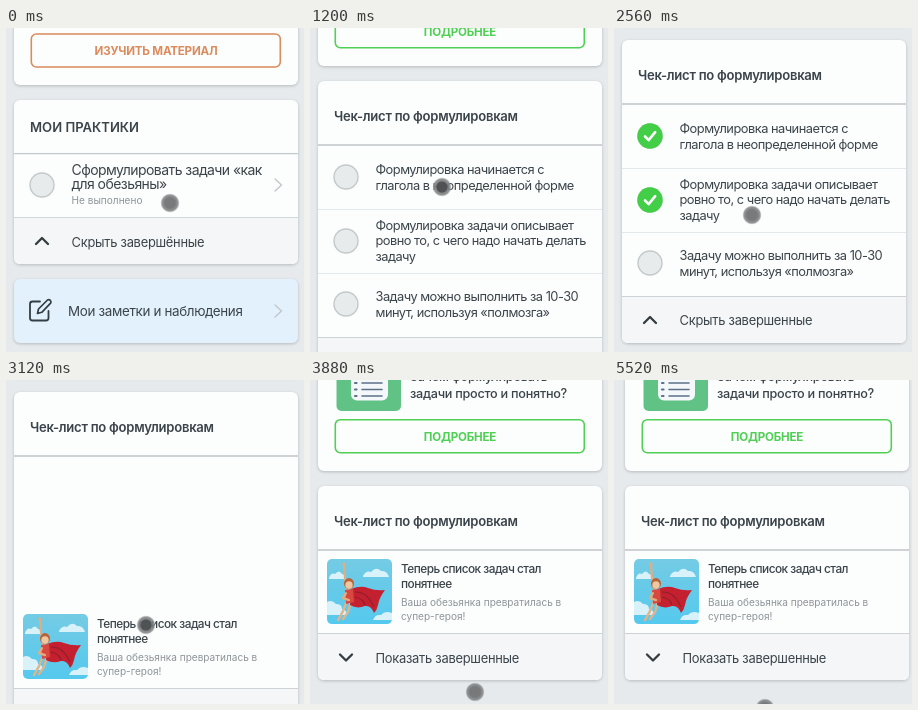
Recreate the animation shown at these times as an HTML page. Size 298x324 px, loop 5.6 s.

```html
<!DOCTYPE html>
<html lang="ru">
<head>
<meta charset="utf-8">
<style>
  html, body { margin: 0; width: 100%; height: 100%; overflow: hidden; background: #e6eaec; }
  svg { display: block; width: 100vw; height: 100vh; }
  text { font-family: Inter, Roboto, sans-serif; fill: #3b444a; white-space: pre; }
  .card { fill: #fcfdfd; filter: drop-shadow(0 1px 1.5px #0003); }
  .line { fill: none; stroke-linecap: round; stroke-linejoin: round; }
</style>
</head>
<body>
<svg id="stage" viewBox="0 0 298 324"></svg>
<script>
const LOOP = 5600, OPEN = 660, COLLAPSE = 3000;
const CHECKS = [1920, 2280, 2760];
const ROW_Y = [61, 125, 188];
const ROWS_H = 192, HERO_H = 83;

const text = (x, y, s, size, { w = 400, ls = 0, fill = '#3b444a', mid } = {}) =>
  `<text x="${x}" y="${y + size * .35}" font-size="${size}" font-weight="${w}"
    letter-spacing="${ls}em" style="fill:${fill}" ${mid ? 'text-anchor="middle"' : ''}>${s}</text>`;
const card = (y, h, extra = '') =>
  `<rect class="card" x="8" y="${y}" width="284" height="${h}" rx="6" ${extra}/>`;
const rule = (y, color, width = 1) => `<path d="M8 ${y}H292" stroke="${color}" stroke-width="${width}"/>`;
const line = (d, color, width) =>
  `<path class="line" d="${d}" stroke="${color}" stroke-width="${width}"/>`;
const button = (y, label, color, size) =>
  `<rect x="25.3" y="${y}" width="249" height="33" rx="5" fill="none" stroke="${color}" stroke-width="1.6"/>` +
  text(150, y + 17, label, size, { w: 700, ls: -.02, fill: color, mid: true });
const circle = y => `<circle cx="36" cy="${y}" r="12" fill="#e7ebeb" stroke="#c3c9ca" stroke-width="1.4"/>`;
const arrow = y => line(`M269 ${y - 6}l6.5 6-6.5 6`, '#c0c7cb', 1.4);
const footerShape = '<path d="M8 0H292V41q0 6-6 6H14q-6 0-6-6Z" fill="#f4f6f7"/>';
const item = (y, ...lines) =>
  lines.map((s, i) => text(65.5, y + i * 15.5, s, 12.85, { ls: -.04 })).join('');
const tick = (y, i) =>
  `<g id="tick${i}"><circle r="12.7" fill="#42cf47"/>${line('M-5 .5l3.6 3.7L5.2-3.8', '#fff', 2.6)}</g>`;

const practices = `
  ${card(-20, 77)}${button(6, 'ИЗУЧИТЬ МАТЕРИАЛ', '#dc8b5c', 11.6)}
  ${card(72, 164)}
  <g transform="translate(0 189)">${footerShape}</g>
  ${rule(125.7, '#c3c9cc', 1.3)}${rule(189.5, '#d3d8da')}
  ${text(24, 99, 'МОИ ПРАКТИКИ', 13.1, { w: 600 })}
  ${circle(157)}${arrow(157)}
  ${text(65.5, 142.5, 'Сформулировать задачи «как', 14, { ls: -.04 })}
  ${text(65.5, 156.5, 'для обезьяны»', 14, { ls: -.04 })}
  ${text(65.5, 172.7, 'Не выполнено', 10.1, { fill: '#8d9498' })}
  ${line('M30 216l6-6 6 6', '#343c41', 2.3)}
  ${text(65.5, 214, 'Скрыть завершённые', 12.9, { ls: -.02 })}
  ${card(251, 64, 'style="fill:#e3f1fc"')}
  ${line('M34 273.5H26.5q-2.5 0-2.5 2.5V290q0 2.5 2.5 2.5H40q2.5 0 2.5-2.5V283', '#343d43', 1.8)}
  ${line('M31.5 285.5l1-4.5L41.5 272q1.5-1 2.8.3t.3 2.9L35.8 284.3Z', '#343d43', 1.7)}
  ${text(62, 283, 'Мои заметки и наблюдения', 13.4, { ls: -.025 })}
  ${arrow(283)}`;

// Local 65 x 65 picture of the flying hero
const heroPicture = `
  <rect width="65" height="65" rx="5" fill="url(#sky)"/>
  <g fill="#d9f2fa">
    <path d="M2 19q2-6 6-4 4-5 7 0 3 0 3 5H2Z"/>
    <path d="M36 17q3-6 8-4 5-6 10-1 6-1 8 6H36Z"/>
    <path d="M0 56V43q5-3 9 2 6 0 6 5 5 1 5 6Z"/>
    <path d="M46 61q2-6 8-5 4-5 11-2v7Z"/>
  </g>
  ${line('M20 42L16 52 11 61M24 43L21 53 16 60', '#e0b48c', 2.4)}
  <path d="M24 30Q34 26 41 29 49 32 58 31 52 39 51 46 50 51 47 54 44 46 38 47 30 50 23 46Z" fill="#c4202f"/>
  <path d="M28 33Q40 32 47 48M28 38Q36 39 38 46" fill="none" stroke="#94202c" stroke-width="1.3"/>
  ${line('M20 30L18 19 17 6', '#e3ad80', 2.2)}
  <path d="M18 31l8-1 1 13-8 2Z" fill="#d8483f"/>
  ${line('M19 34L16 39 22 41', '#e3ad80', 2.2)}
  <ellipse cx="22" cy="24.5" rx="5" ry="5.5" fill="#b8623a"/>
  <ellipse cx="22" cy="26" rx="3.7" ry="3.8" fill="#f0c8a0"/>
  <circle cx="17" cy="5" r="1.6" fill="#e3ad80"/>`;

// Checklist page, measured from the middle of its heading
const checklist = `
  ${card(-400, 350)}
  <rect x="26.5" y="-174" width="64.5" height="64" rx="5" fill="#60c385"/>
  <rect x="41" y="-162" width="37" height="41.5" rx="6" fill="#f4f8fa"/>
  ${[-151, -144.5, -138, -131.5, -125].map(y =>
    line(`M45 ${y}h1.5`, '#5d6f89', 2.2) + line(`M52 ${y}h20`, '#5d6f89', 1.6)).join('')}
  ${text(100, -144, 'Зачем формулировать', 12.65, { w: 500, ls: -.02 })}
  ${text(100, -127.7, 'задачи просто и понятно?', 12.65, { w: 500, ls: -.02 })}
  ${button(-101.3, 'ПОДРОБНЕЕ', '#4fd054', 11.6)}
  ${card(-35, 303, 'id="list"')}
  ${text(24, .6, 'Чек-лист по формулировкам', 13.1, { w: 600, ls: -.02 })}
  <g id="rows">
    ${rule(93.5, '#e5e8ea')}${rule(157.5, '#e5e8ea')}
    ${ROW_Y.map(circle).join('')}${ROW_Y.map(tick).join('')}
    ${item(54, 'Формулировка начинается с', 'глагола в неопределенной форме')}
    ${item(109.5, 'Формулировка задачи описывает', 'ровно то, с чего надо начать делать', 'задачу')}
    ${item(181, 'Задачу можно выполнить за 10-30', 'минут, используя «полмозга»')}
  </g>
  ${rule(29, '#c0c6ca', 1.4)}
  <g id="hero">
    <g transform="translate(17 8.4)">${heroPicture}</g>
    ${text(91, 18, 'Теперь список задач стал', 11.85, { w: 500, ls: -.045 })}
    ${text(91, 33.2, 'понятнее', 11.85, { w: 500, ls: -.045 })}
    ${text(91, 52, 'Ваша обезьянка превратилась в', 10.05, { fill: '#8d9498' })}
    ${text(91, 65.7, 'супер-героя!', 10.05, { fill: '#8d9498' })}
  </g>
  <g id="footer">
    ${footerShape}${rule(.5, '#cdd2d5')}
    <g id="hide">${line('M30 27l6-6 6 6', '#343c41', 2.3)}
      ${text(65.5, 24.8, 'Скрыть завершенные', 12.9, { ls: -.02 })}</g>
    <g id="show">${line('M30 21.5l6 6 6-6', '#343c41', 2.3)}
      ${text(65.5, 25.7, 'Показать завершенные', 12.9, { ls: -.02 })}</g>
  </g>`;

document.getElementById('stage').innerHTML = `
  <defs>
    <linearGradient id="sky" x2="0" y2="1">
      <stop stop-color="#74cbe4"/><stop offset="1" stop-color="#55c9ee"/>
    </linearGradient>
    <radialGradient id="soft">
      <stop offset=".55" stop-color="#717375"/>
      <stop offset=".85" stop-color="#858789" stop-opacity=".9"/>
      <stop offset="1" stop-color="#a5a8a9" stop-opacity=".2"/>
    </radialGradient>
  </defs>
  <rect width="298" height="324" fill="#e6eaec"/>
  <g id="practices">${practices}</g>
  <g id="checklist">${checklist}</g>
  <g id="pointer">
    <circle r="9.5" fill="url(#soft)" opacity=".95"/>
    <circle id="press" r="5.5" fill="#404346"/>
  </g>`;

const el = id => document.getElementById(id);
const set = (id, attrs) => { for (const k in attrs) el(id).setAttribute(k, attrs[k]); };
const move = (id, x, y, s = 1) => set(id, { transform: `translate(${x} ${y}) scale(${s})` });
const show = (id, on) => set(id, { opacity: +on });
const ramp = (t, a, b) => Math.min(1, Math.max(0, (t - a) / (b - a)));
const smooth = u => u * u * (3 - 2 * u);

// Pointer keys: time, x, y, pressure
const PATH = [
  [0, 164, 175, 0], [300, 150, 171, 0], [520, 141, 164, 1], [640, 141, 164, 0],
  [800, 134, 230, 1], [1200, 132, 159, 1], [1400, 133, 118, 1], [1560, 135, 114, 0],
  [1800, 138, 112, 0], [1900, 138, 112, 1], [2020, 138, 114, 0], [2180, 138, 178, 0],
  [2260, 138, 178, 1], [2380, 138, 180, 0], [2560, 138, 187, 0], [2720, 140, 243, 1],
  [3120, 140, 245, 1], [3280, 141, 247, 0], [3880, 165, 312, 0], [4160, 162, 274, 0],
  [4360, 162, 274, .5], [4560, 162, 274, 0], [4780, 162, 274, 0], [5380, 151, 320, 0],
  [5520, 151, 328, 0], [LOOP, 151, 328, 0]
];
function pointerAt(t) {
  const i = PATH.findIndex(k => k[0] > t), a = PATH[i - 1], b = PATH[i];
  const u = smooth(ramp(t, a[0], b[0]));
  return a.map((v, k) => v + (b[k] - v) * u);
}

function headingY(t, rowsH) {
  if (t >= COLLAPSE) return Math.max(47, 141 - rowsH);
  if (t < 1200) return 159 - 71 * smooth(ramp(t, 800, 1200));
  return 88 - 41 * smooth(ramp(t, 1200, 1400));
}

function draw(t) {
  const done = t >= COLLAPSE;
  const rowsH = ROWS_H * (1 - smooth(ramp(t, COLLAPSE, 3395)));
  const heroH = HERO_H * ramp(t, COLLAPSE, 3080);
  const bodyEnd = 29 + rowsH + heroH;

  show('practices', t < OPEN);
  show('checklist', t >= OPEN);
  move('checklist', 3 * smooth(ramp(t, 4000, 4120)), headingY(t, rowsH));
  show('rows', 1 - ramp(t, COLLAPSE, 3080));
  CHECKS.forEach((start, i) => move('tick' + i, 36, ROW_Y[i], smooth(ramp(t, start, start + 100))));
  set('list', { height: bodyEnd + 82 });
  move('hero', 0, 29.7 + rowsH);
  show('hero', ramp(t, COLLAPSE, 3100));
  move('footer', 0, bodyEnd);
  show('hide', !done);
  show('show', done);

  const [, x, y, press] = pointerAt(t);
  move('pointer', x, y);
  set('press', { opacity: press * .7 });
}

const start = performance.now();
function frame() {
  draw((performance.now() - start) % LOOP);
  requestAnimationFrame(frame);
}
frame();
</script>
</body>
</html>
```
